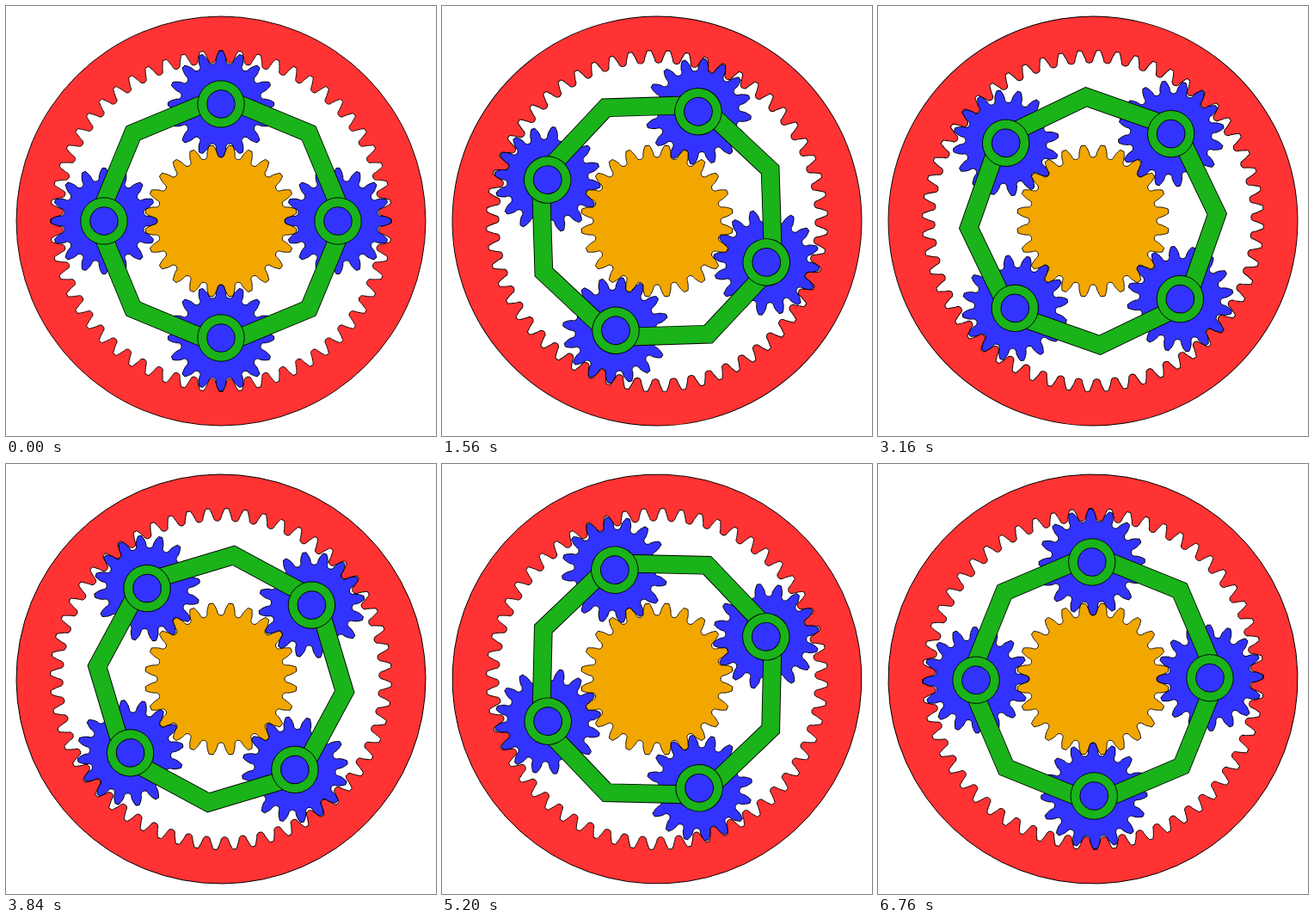
Recreate the animation shown at these times as an HTML page. Size 500 by 500 pixels, loop 6800 ms.

```html
<!DOCTYPE html>
<html lang="en">
<head>
<meta charset="utf-8">
<title>Planetary gear</title>
<style>
  html, body { margin: 0; width: 100%; height: 100%; overflow: hidden; background: #fff; }
  svg { display: block; width: 100vw; height: 100vh; }
</style>
</head>
<body>
<svg id="stage" viewBox="-250 -250 500 500" stroke="#000" stroke-width="0.9" stroke-linejoin="round"
  shape-rendering="crispEdges"></svg>
<script>
const LOOP = 6800, STEP = 40;
const SUN = 24, PLANET = 16, RING = SUN + 2 * PLANET;
const HALF_MODULE = 3.4;
const ORBIT = (SUN + PLANET) * HALF_MODULE;
const PRESSURE = Math.PI / 9;
const RED = '#ff3333', BLUE = '#3333ff', GREEN = '#1ab31a', ORANGE = '#f2a600';

const stage = document.getElementById('stage');

function add(parent, tag, attrs = {}) {
  const node = document.createElementNS('http://www.w3.org/2000/svg', tag);
  for (const key in attrs) node.setAttribute(key, attrs[key]);
  return parent.appendChild(node);
}

// Angle 0 points up, positive is clockwise.
const polar = (r, a) => `${(r * Math.sin(a)).toFixed(2)} ${(-r * Math.cos(a)).toFixed(2)}`;
const closed = points => `M${points.join('L')}Z`;
const involute = a => Math.tan(a) - a;

// Involute teeth, cut off at the tip and rounded at the root; phase is in tooth pitches.
function gearPath(teeth, root, tip, phase = 0) {
  const base = teeth * HALF_MODULE * Math.cos(PRESSURE);
  const gap = Math.PI / teeth;
  const half = r => gap / 2 + involute(PRESSURE) - involute(Math.acos(Math.min(1, base / r)));
  const fillet = root + 4;
  const foot = half(fillet);
  const flank = [];
  for (let i = 0; i < 6; i++) {
    const t = i / 6 * Math.PI / 2;
    flank.push([fillet - (fillet - root) * Math.cos(t), gap - (gap - foot) * Math.sin(t)]);
  }
  for (let i = 0; i <= 8; i++) {
    const r = fillet + (tip - fillet) * i / 8;
    flank.push([r, half(r)]);
  }

  const points = [];
  for (let i = 0; i < teeth; i++) {
    const middle = (i + phase) * 2 * gap;
    for (const [r, a] of flank) points.push(polar(r, middle - a));
    for (const [r, a] of [...flank].reverse()) points.push(polar(r, middle + a));
  }
  return closed(points);
}

const circlePath = r => `M${-r} 0A${r} ${r} 0 1 1 ${r} 0A${r} ${r} 0 1 1 ${-r} 0Z`;
const octagon = r => closed(Array.from({ length: 8 }, (_, i) => polar(r, i * Math.PI / 4)));

const ring = add(stage, 'path', {
  d: circlePath(238) + gearPath(RING, 183.8, 198.3), fill: RED, 'fill-rule': 'evenodd'
});
add(stage, 'path', { d: gearPath(SUN, 74, 88.4, 0.5), fill: ORANGE });

const carrier = add(stage, 'g');
const addArm = i => add(carrier, 'g', { transform: `rotate(${i * 90}) translate(0 ${-ORBIT})` });
const planets = [0, 1, 2, 3].map(i =>
  add(addArm(i), 'path', { d: gearPath(PLANET, 47, 61.6), fill: BLUE }));

add(carrier, 'path', { d: octagon(155.8) + octagon(133.2), fill: GREEN, 'fill-rule': 'evenodd' });
for (let i = 0; i < 4; i++) {
  const hub = addArm(i);
  add(hub, 'circle', { r: 27.2, fill: GREEN });
  add(hub, 'circle', { r: 16.4, fill: BLUE });
}

function draw(time) {
  const turn = 90 * Math.floor(time % LOOP / STEP) * STEP / LOOP;
  const rotate = (node, angle) => node.setAttribute('transform', `rotate(${angle})`);
  rotate(carrier, turn);
  rotate(ring, turn * (1 + SUN / RING));
  // Planets already turn with the carrier, so only their own spin is added.
  for (const planet of planets) rotate(planet, turn * SUN / PLANET);
}

const start = performance.now();
function tick() {
  draw(performance.now() - start);
  requestAnimationFrame(tick);
}
tick();
</script>
</body>
</html>
```
